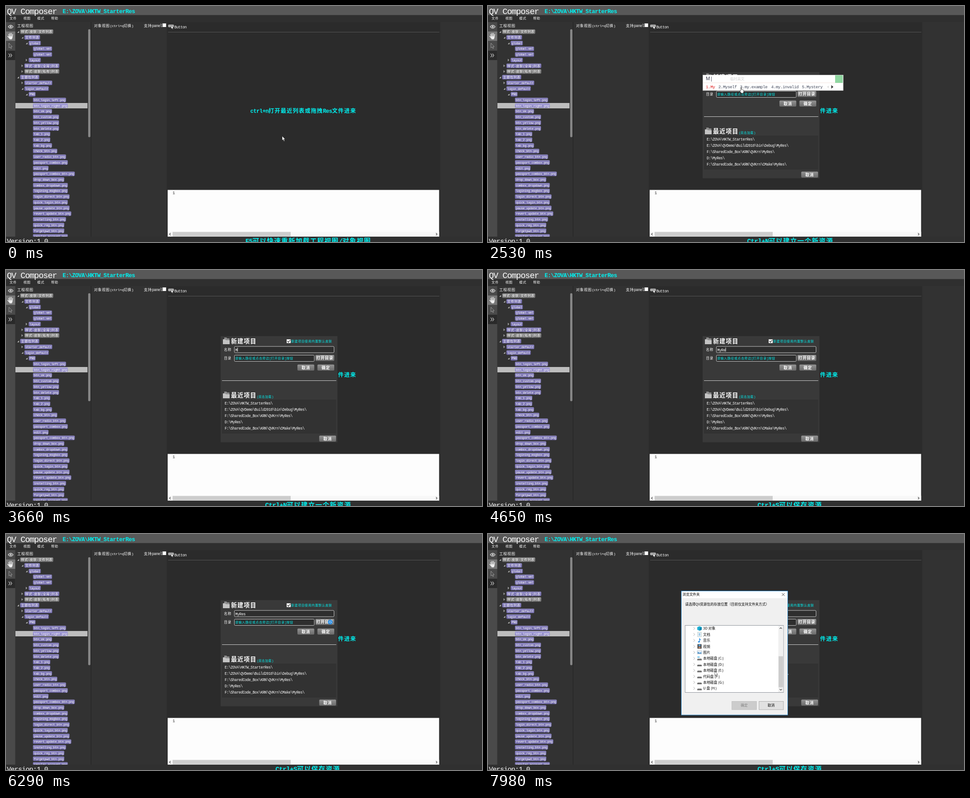
Animation of 1060 by 528 pixels, one loop 8 s. Source, as an HTML page:

```html
<!DOCTYPE html>
<html lang="zh-CN">
<head>
<meta charset="utf-8">
<title>Resource editor</title>
<style>
  html, body { margin: 0; width: 100%; height: 100%; overflow: hidden; background: #313131; }
  svg { display: block; width: 1060px; height: 528px; }
  text { white-space: pre; font-family: "Noto Sans CJK SC", "Noto Sans CJK JP", sans-serif; }
  .mono { font-family: "Liberation Mono", monospace; font-size: .92em; letter-spacing: -.0565em; }
  .wide { font-size: .92em; letter-spacing: .087em; }
</style>
</head>
<body>
<svg id="stage" viewBox="0 0 1060 528">
  <defs>
    <linearGradient id="violet" x2="0" y2="1"><stop stop-color="#a29be0"/><stop offset="1" stop-color="#7a71c0"/></linearGradient>
    <linearGradient id="grey" x2="0" y2="1"><stop stop-color="#939393"/><stop offset="1" stop-color="#6b6b6b"/></linearGradient>
    <clipPath id="treeClip"><rect x="21" y="50" width="162" height="466"/></clipPath>
    <clipPath id="listClip"><rect x="440" y="205" width="206" height="149"/></clipPath>
  </defs>
</svg>
<script>
const LOOP = 8000;
const CYAN = '#00f0f0';
const stage = document.getElementById('stage');

function add(parent, tag, attrs = {}) {
  const el = document.createElementNS('http://www.w3.org/2000/svg', tag);
  for (const k in attrs) el.setAttribute(k, attrs[k]);
  return parent.appendChild(el);
}
const group = (parent, attrs) => add(parent, 'g', attrs);
const rect = (p, x, y, width, height, fill, more) =>
  add(p, 'rect', { x, y, width, height, fill, ...more });
const path = (p, d, fill = 'none', stroke = 'none', w = 1) =>
  add(p, 'path', { d, fill, stroke, 'stroke-width': w });

// Latin runs are half an em per letter, Chinese runs a full em.
function text(p, str, x, cy, size, fill = '#fff', weight = 400) {
  const el = add(p, 'text', { x, y: cy + size * .36, fill, 'font-size': size, 'font-weight': weight });
  for (const run of str.match(/[\x00-\x7f]+|[^\x00-\x7f]+/g)) {
    add(el, 'tspan', { class: run.charCodeAt(0) < 128 ? 'mono' : 'wide' }).textContent = run;
  }
  return el;
}
function label(p, str, x, cy, size = 7.7, fill = '#000', more = {}) {
  const el = add(p, 'text', { x, y: cy + size * .36, fill, 'font-size': size, ...more });
  el.textContent = str;
  return el;
}
const ems = str => [...str].reduce((n, c) => n + (c < '\x80' ? .5 : 1), 0);

// Timed states: every value is held until the next step.
function hold(el, prop, steps) {
  const frames = [...steps, [LOOP, steps[steps.length - 1][1]]]
    .map(([t, v]) => ({ offset: t / LOOP, [prop]: v, easing: 'step-end' }));
  el.animate(frames, { duration: LOOP, iterations: Infinity });
}
// Shows at the first time, hides at the second, and so on.
function toggle(el, ...times) {
  const steps = times.map((t, i) => [t, 1 - i % 2]);
  hold(el, 'opacity', times[0] ? [[0, 0], ...steps] : steps);
}

function drawShell() {
  const g = group(stage);
  rect(g, 0, 0, 1060, 528, '#323232');
  rect(g, 0, 0, 1060, 20.5, '#585858');
  rect(g, 0, 20.5, 1060, 15, '#2f2f2f');
  text(g, 'QV Composer', 2, 11, 20.2);
  text(g, String.raw`E:\ZOVA\HKTW_StarterRes`, 126, 11, 14, CYAN, 700);
  ['文件', '视图', '模式', '帮助'].forEach((s, i) => text(g, s, 8 + i * 30.8, 27.5, 8));

  rect(g, 0, 36, 20.5, 480, '#4a4a4a');
  rect(g, 0, 57, 20.5, 21, '#777');
  rect(g, 0, 100, 20.5, 21, '#2a2a2a');
  path(g, 'M5 46.5Q10.5 39.5 16 46.5Q10.5 53 5 46.5Z', 'none', '#ccc', 1.3);
  add(g, 'circle', { cx: 10.5, cy: 46.3, r: 2, fill: '#ccc' });
  path(g, 'M6.5 68H14.5V70.5Q14 72 13 74.5H8Z', '#eee');
  path(g, 'M7 69L6.300 63M9.200 68L8.900 61M11.500 68L12 61M13.600 69L14.800 63.500M7.500 72L3.800 67.500', 'none', '#eee', 1.5)
    .setAttribute('stroke-linecap', 'round');
  path(g, 'M6.500 83V94L9 91.500 11 95.500 12.500 94.500 10.800 91H14Z', 'none', '#999', 1);
  path(g, 'M6 106.500L9 110.500 6 114.500M10 106.500L13 110.500 10 114.500', 'none', '#ddd', 1.2);

  rect(g, 188, 36, 2.5, 480, '#2b2b2b');
  rect(g, 358, 36, 609, 480, '#2b2b2b');
  rect(g, 361, 58, 604, 1, '#555');
  text(g, '工程视图', 25, 43.5, 9);
  text(g, '对象视图(ctrl+q切换)', 196, 43.5, 8.8);
  text(g, '支持panel', 307, 43.5, 9);
  rect(g, 348.5, 39, 8, 8, '#fff');
  rect(g, 361, 41.5, 13, 6, '#aaa', { rx: 2 });
  path(g, 'M368 44V51L369.600 49.600 371 52 372 51.500 371 49H373Z', '#fff', '#333', .5);
  text(g, 'Button', 375, 47, 9);
  text(g, 'ctrl+n打开最近列表或拖拽Res文件进来', 544, 234, 13.5, CYAN, 700);

  rect(g, 360, 411.5, 604.5, 104.5, '#fdfdfd');
  text(g, '1', 371, 417.5, 9.5, '#222');
  rect(g, 360, 505, 604.5, 11, '#f8f8f8');
  rect(g, 371, 505.5, 263, 10, '#cdcdcd');
  path(g, 'M366.500 508L364 510.500 366.500 513M957.500 508L960 510.500 957.500 513', 'none', '#444', 1.2);
  rect(g, 0, 516, 1060, 12, '#303030');
  text(g, 'Version:1.0', 2, 525.5, 16.6);
}

// Depth by indent; "-" open, "+" closed, "." leaf, "!" grey.
const TREE = `-!样式-皮肤-文件列表
 -文件列表
  -global
   .global.xml
   .global.xml
  +layout
 +样式-皮肤(全局)列表
 +!样式-皮肤(私有)列表
-主题包列表
 +starter_default
 -login_default
  -PNG
${'btn_login_left btn_login_right btn_ok btn_custom btn_yellow btn_delete tab_1 tab_2 tab_bg check_btn user_radio_btn passport_combox edit passport_combox_btn drop_down_box combox_dropdown logining_msgbox login_direct_btn quick_login_btn pause_update_btn revert_update_btn installing_btn quick_reg_btn forgetpwd_btn regular_account'
  .split(' ').map(s => `   .${s}.png`).join('\n')}`;

function drawTree() {
  const g = group(stage, { 'clip-path': 'url(#treeClip)' });
  rect(g, 21, 217, 160.5, 12, '#bdbdbd');
  TREE.split('\n').forEach((row, i) => {
    const [, indent, kind, grey, name] = row.match(/^( *)([-+.])(!?)(.*)$/);
    const x = 31.5 + indent.length * 9.5, y = 57.5 + i * 12.72;
    if (kind === '-') path(g, `M${x - 2.5} ${y - 1.5}V${y + 2.5}H${x - 6.5}Z`, '#bbb');
    if (kind === '+') path(g, `M${x - 6.5} ${y - 3}L${x - 3} ${y}L${x - 6.5} ${y + 3}Z`, '#999');
    rect(g, x, y - 5, ems(name) * 7.8 + 3.5, 10, grey ? 'url(#grey)' : 'url(#violet)',
      { rx: 2, 'fill-opacity': grey ? 1 : .82 });
    text(g, name, x + 2, y, 7.8);
  });
  rect(stage, 183, 52, 5, 241.5, '#858585', { rx: 2 });
}

function drawHints() {
  const hints = [
    ['F5可以快速重新加载工程视图/对象视图', 533, [0, 390]],
    ['Ctrl+N可以建立一个新资源', 577, [390, 4370]],
    ['Ctrl+S可以保存资源', 600, [4370]]
  ];
  for (const [s, x, times] of hints) toggle(text(stage, s, x, 525, 16, CYAN, 700), ...times);
}

function folder(p, x, y) {
  path(p, `M${x + 3} ${y}h5l1.500 2h5v10h-11.500Z`, '#8c8c8c');
  path(p, `M${x} ${y + 4}h5l1.500 2h8.500v9h-15Z`, '#c4c4c4');
}
function button(p, s, x, y, w) {
  rect(p, x, y, w, 13.5, 'url(#grey)', { rx: 2 });
  text(p, s, x + w / 2 - ems(s) * 4.75, y + 6.7, 9.5, '#fff', 700);
}

function drawProject() {
  const g = group(stage);
  toggle(g, 390);
  rect(g, 478, 148, 260, 237.5, '#393939');
  folder(g, 483, 151);
  text(g, '新建项目', 501, 158.5, 14.3, '#fff', 700);
  rect(g, 625, 155, 9, 8.5, '#fff');
  path(g, 'M626.500 159L629 161.500 633 156.500', 'none', '#222', 1.2);
  text(g, '新建项目使用内置默认皮肤', 635, 159.5, 7.6, CYAN);
  text(g, '名称', 485.5, 178.5, 8.3);
  text(g, '目录', 485.5, 197.5, 8.3);
  const field = { rx: 2, stroke: '#c8c8c8' };
  rect(g, 508.5, 171, 222, 14, '#2e2e2e', field);
  rect(g, 508.5, 190.5, 178, 14, '#2e2e2e', field);
  text(g, '请输入路径或点击旁边[打开目录]按钮', 510, 197.5, 7.65, CYAN);
  button(g, '打开目录', 689, 190, 42);
  button(g, '取消', 649, 211.5, 37.5);
  button(g, '确定', 693.5, 211.5, 37.5);
  rect(g, 481, 247, 254.5, 1, '#d0d0d0');
  folder(g, 483, 272);
  text(g, '最近项目', 501, 280, 14.3, '#fff', 700);
  text(g, '(双击加载)', 558.5, 283, 7.4, CYAN);
  rect(g, 481, 290, 254.5, 76, '#323232');
  String.raw`E:\ZOVA\HKTW_StarterRes\
E:\ZOVA\QVDemo\Build2010\bin\Debug\MyRes\
F:\SharedCode_Box\KRN\QVKrn\MyRes\
D:\MyRes\
F:\SharedCode_Box\KRN\QVKrn\CMake\MyRes\ `.split('\n')
    .forEach((s, i) => text(g, s.trim(), 487, 297.5 + i * 14, 8.9));
  button(g, '取消', 697.5, 370.5, 37.5);

  // Typing in the name field
  const typed = [3660, 3940, 4220, 4650, 4900];
  [...'MyRes'].forEach((c, i) => toggle(text(g, c, 510.5 + i * 4.55, 178.3, 9.1), typed[i]));
  const caret = rect(g, 510.5, 173.5, 1, 9, '#fff');
  toggle(caret, 1740, 2040, 3360, 5050, 5330, 5880);
  hold(caret, 'transform', [[0, 0], ...typed.map((t, i) => [t, i + 1])]
    .map(([t, n]) => [t, `translate(${n * 4.55}px, 0px)`]));
}

function drawInput() {
  const g = group(stage);
  toggle(g, 2530, 3360);
  rect(g, 478.5, 154.5, 312.5, 34.5, '#fff', { stroke: '#ddd', 'stroke-width': .7 });
  rect(g, 479, 171.5, 311, .7, '#f0d9d2');
  const sans = { style: 'font-family:"Noto Sans",sans-serif', 'font-weight': 500 };
  toggle(label(g, 'M|', 485, 162.5, 10.5, '#334', sans), 2530, 2800);
  toggle(label(g, 'My|', 485, 162.5, 10.5, '#334', sans), 2800);
  label(g, '临时英文', 539, 163, 8, '#cfcfcf');
  rect(g, 773, 155, 17, 17, '#8fd6a0');
  [['1.My', 485], ['2.Myself', 513], ['3.my.example', 561], ['4.my.invalid', 630.5], ['5.Mystery', 699]]
    .forEach(([s, x], i) => text(g, s, x, 180.5, 10.2, i ? '#444a5c' : '#e02020'));
  path(g, 'M758.500 178L755.500 181 758.500 184Z', '#d5d5d5');
  path(g, 'M764.500 177L769 181 764.500 185Z', '#333');
}

const ICONS = {
  pc(p) { rect(p, -5, -4.5, 10, 7, '#1e90e0', { stroke: '#57a6d8', 'stroke-width': .7 }); rect(p, -3, 3.5, 6, 1, '#888'); },
  down(p) { path(p, 'M-1.500 -5H1.500V-.500H4.500L0 4.500 -4.500 -.500H-1.500Z', '#1e7fd6'); },
  desk(p) { rect(p, -5, -4, 10, 8, '#1483dc'); rect(p, -5, 2.5, 10, 1.5, '#0a5fa8'); },
  cube(p) { path(p, 'M0 -5L5 -3V3L0 5 -5 3V-3Z', '#1fb0d4'); path(p, 'M0 -1L5 -3V3L0 5Z', '#0f86ad'); },
  doc(p) { rect(p, -4, -5, 8, 10, '#fff', { stroke: '#8aa', 'stroke-width': .7 }); path(p, 'M-2 -2H2M-2 0H2M-2 2H2', 'none', '#3a8fd0', .9); },
  note(p) { path(p, 'M0 3V-4.500Q1 -2 3 -1', 'none', '#1e88e5', 1.4); add(p, 'ellipse', { cx: -1.3, cy: 3, rx: 2, ry: 1.6, fill: '#1e88e5' }); },
  film(p) { rect(p, -4.5, -5, 9, 10, '#3b3b3b'); rect(p, -2.5, -4, 5, 3.5, '#5ea3d8'); rect(p, -2.5, .5, 5, 3.5, '#c08a6a'); },
  photo(p) { rect(p, -5, -3.5, 10, 7, '#e8f3fb', { stroke: '#9ab', 'stroke-width': .7 }); path(p, 'M-4 2.500V-1L0 1 4 0V2.500Z', '#2f7fc0'); },
  sys(p) { rect(p, -4.5, -4, 2, 2, '#18a0e0'); rect(p, -2, -4, 2, 2, '#18a0e0'); ICONS.disk(p); },
  disk(p) { path(p, 'M-4 0H4L5 2.200H-5Z', '#aaa'); rect(p, -5, 2, 10, 2, '#444'); }
};
const PLACES = [['此电脑', 'pc'], ['下载', 'down'], ['桌面', 'desk'], ['3D 对象', 'cube'], ['文档', 'doc'],
  ['音乐', 'note'], ['视频', 'film'], ['图片', 'photo'], ['本地磁盘 (C:)', 'sys'], ['本地磁盘 (D:)', 'disk'],
  ['本地磁盘 (E:)', 'disk'], ['代码盘 (F:)', 'disk'], ['本地磁盘 (G:)', 'disk'], ['U 盘 (H:)', 'disk']];

function drawBrowser() {
  const g = group(stage), step = 13.4, scrollAt = 7260;
  toggle(g, 6440);
  rect(g, 430.5, 127.5, 237, 277.5, '#f0f0f0', { stroke: '#2a86c8' });
  rect(g, 431, 128, 236, 15.5, '#fff');
  label(g, '浏览文件夹', 433, 135.5);
  path(g, 'M654.500 132.500L660.500 138.500M660.500 132.500L654.500 138.500', 'none', '#222', .9);
  label(g, '请选择QV资源包的存放位置（目前仅支持文件夹方式）', 439, 157.5);
  rect(g, 439, 204.5, 219, 150, '#fff', { stroke: '#828790', 'stroke-width': .9 });

  const rows = group(group(g, { 'clip-path': 'url(#listClip)' }));
  rect(rows, 465, 205.5, 28, 12, '#cce8ff');
  PLACES.forEach(([name, icon], i) => {
    const y = 211.3 + i * step, x = i ? 471 : 459;
    if (i) path(rows, `M457.500 ${y - 3}l3 3l-3 3`, 'none', '#999', .9);
    else path(rows, `M444 ${y - 1.5}l3 3l3 -3`, 'none', '#444', .9);
    ICONS[icon](group(rows, { transform: `translate(${x} ${y})` }));
    label(rows, name, x + 8, y, 7.9);
  });
  hold(rows, 'transform', [[0, 'translate(0px, 0px)'], [scrollAt, `translate(0px, ${-3 * step}px)`]]);

  rect(g, 646.5, 205, 11, 149, '#f0f0f0');
  path(g, 'M649.500 212L652 209.500 654.500 212M649.500 347L652 349.500 654.500 347', 'none', '#444', 1.1);
  const thumb = rect(g, 647, 254, 10, 69.5, '#cdcdcd');
  hold(thumb, 'transform', [[0, 'translate(0px, 0px)'], [scrollAt, 'translate(0px, 19.5px)']]);

  const mid = { 'text-anchor': 'middle' };
  rect(g, 543, 374.5, 55, 18.5, '#ccc', { stroke: '#bfbfbf' });
  label(g, '确定', 570.5, 383.5, 7.8, '#838383', mid);
  rect(g, 603.5, 374.5, 54.5, 18.5, '#e1e1e1', { stroke: '#adadad' });
  label(g, '取消', 630.5, 383.5, 7.8, '#000', mid);
}

function drawPointer() {
  const g = group(stage);
  const arrow = path(g, 'M0 0V9.700L2.200 7.700 4 11.700 5.600 11 3.900 7.200H6.800Z', '#fff', '#111', .6);
  const hand = path(g, 'M2 7V1Q2.900 -.300 3.800 1V5Q4.800 4.300 5.500 5.300Q6.500 4.800 7 5.800Q8.200 5.500 8.400 6.700V9.500L7.400 13H3L.200 9Q-.400 7.300 .700 7.200Z', '#fff', '#111', .7);
  const busy = group(g);
  add(busy, 'circle', { r: 5.2, fill: '#1f86e0' });
  add(busy, 'circle', { r: 2.4, fill: 'none', stroke: '#d5ecff', 'stroke-width': 1.2, 'stroke-dasharray': '3 1.1' });

  toggle(arrow, 0, 2530, 5470, 6290, 6440);
  toggle(hand, 2530, 3660);
  toggle(busy, 6290, 6440);
  const track = [
    [0, 615, 291], [520, 614, 290], [660, 612, 286], [800, 609, 281], [930, 606, 276], [1050, 593, 230],
    [1170, 581, 212], [1310, 571, 196], [1450, 564, 186], [1590, 561, 182],
    [5470, 575, 189], [5610, 640, 206], [5750, 693, 211], [5880, 718, 207], [6010, 722, 200], [6150, 722, 197],
    [6580, 706, 206], [6720, 660, 232], [6860, 608, 262], [6990, 556, 284], [7130, 523, 293], [7260, 509, 293],
    [7400, 508, 293], [7550, 507, 296], [7700, 506, 300], [7840, 505, 304], [7980, 505, 307]
  ];
  hold(g, 'transform', track.map(([t, x, y]) => [t, `translate(${x}px, ${y}px)`]));
}

drawShell();
drawTree();
drawHints();
drawProject();
drawInput();
drawBrowser();
drawPointer();
</script>
</body>
</html>
```
